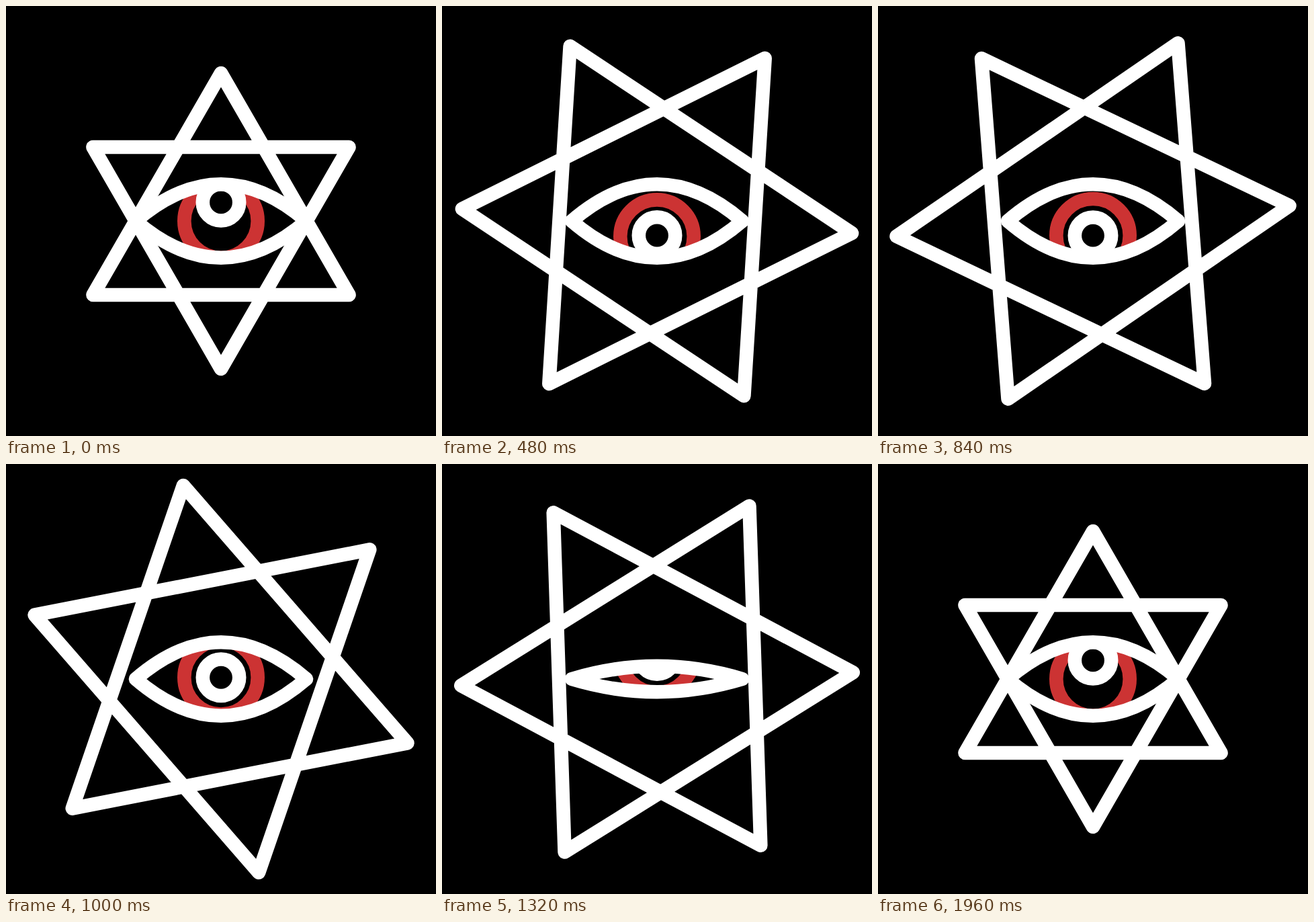
Write an HTML page that moves like this. It is 640 px wide and 640 px high and loops after 2.2 s.

```html
<!DOCTYPE html>
<html lang="en">
<head>
<meta charset="utf-8">
<title>Star and eye</title>
<style>
  html, body { margin: 0; width: 100%; height: 100%; overflow: hidden; background: #000; }
  svg { display: block; width: 100%; height: 100%; }
</style>
</head>
<body>
<svg viewBox="0 0 640 640">
  <defs><clipPath id="opening"><path class="lid"/></clipPath></defs>
  <g fill="none" stroke="#fff" stroke-width="20.6" stroke-linejoin="round">
    <path id="star"/>
    <g clip-path="url(#opening)">
      <circle id="iris" cx="320" r="54.7" fill="#000" stroke="#cc3333"/>
      <circle id="pupil" cx="320" r="27.2" fill="#000"/>
    </g>
    <path class="lid"/>
  </g>
</svg>
<script>
const LOOP = 2200, STEP = 40, END = 1960, C = 320;
const star = document.getElementById('star');
const iris = document.getElementById('iris');
const pupil = document.getElementById('pupil');
const lids = document.querySelectorAll('.lid');

// Cubic Bézier easing with control points (x1, 0) and (x2, 1).
function bezier(x1, x2) {
  return x => {
    let lo = 0, hi = 1;
    for (let i = 0; i < 30; i++) {
      const s = (lo + hi) / 2, r = 1 - s;
      if (3 * r * r * s * x1 + 3 * r * s * s * x2 + s * s * s < x) lo = s;
      else hi = s;
    }
    return lo * lo * (3 - 2 * lo);
  };
}

const spin = bezier(0.31, 0.54);
const snap = bezier(0.26, 0.18);
const smooth = bezier(0.42, 0.58);

function ease(t, start, end, curve) {
  const x = (t - start) / (end - start);
  return x <= 0 ? 0 : x >= 1 ? 1 : curve(x);
}

// Each move is [start, end, target].
function track(t, value, moves) {
  for (const [start, end, target] of moves)
    value += (target - value) * ease(t, start, end, smooth);
  return value;
}

function triangle(radius, degrees) {
  const points = [0, 120, 240].map(offset => {
    const a = (degrees + offset) * Math.PI / 180;
    return `${C + radius * Math.sin(a)} ${C - radius * Math.cos(a)}`;
  });
  return `M${points.join('L')}Z`;
}

function draw(t) {
  const angle = 180 * ease(t, 0, END, spin);
  const grow = ease(t, 0, 640, snap) - ease(t, 1280, END, snap);
  const radius = 220 * (1 + grow / 3);
  star.setAttribute('d', triangle(radius, angle) + triangle(radius, angle + 180));

  iris.setAttribute('cy', track(t, 320, [[160, 640, 350], [680, 1320, 285.5], [1340, 1640, 320]]));
  pupil.setAttribute('cy', track(t, 292.3, [[40, 640, 350], [680, 1320, 285.5], [1340, 1640, 292.3]]));

  const bend = 2 * track(t, 54.7, [[1120, 1460, 0], [1475, END, 54.7]]);
  const d = `M193 ${C}Q${C} ${C - bend} 447 ${C}Q${C} ${C + bend} 193 ${C}Z`;
  lids.forEach(lid => lid.setAttribute('d', d));
}

const began = performance.now();
function frame() {
  const t = (performance.now() - began) % LOOP;
  draw(Math.min(END, Math.floor(t / STEP) * STEP));
  requestAnimationFrame(frame);
}
frame();
</script>
</body>
</html>
```
